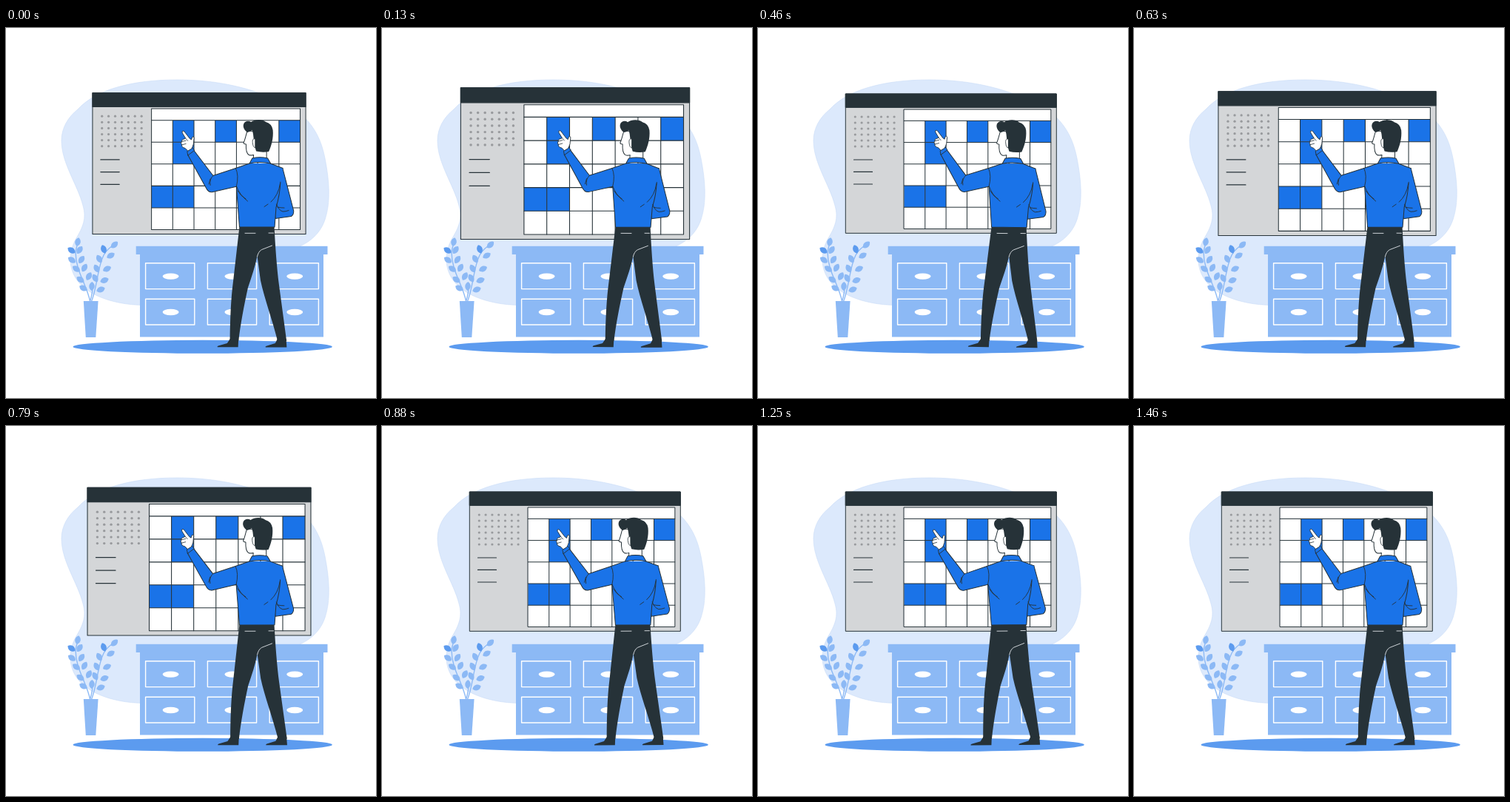
An HTML page with a canvas that plays this animation: 500x500 px, repeating every 1.5 s.

```html
<!DOCTYPE html>
<html lang="en">
<head>
<meta charset="utf-8">
<title>Planning board</title>
<style>
  html, body { margin: 0; width: 100%; height: 100%; overflow: hidden; background: #fff; }
  canvas { display: block; width: 500px; height: 500px; }
</style>
</head>
<body>
<canvas id="stage"></canvas>
<script>
const canvas = document.getElementById('stage');
const ctx = canvas.getContext('2d');
const ratio = window.devicePixelRatio || 1;
canvas.width = canvas.height = 500 * ratio;

const INK = '#263238', BLUE = '#1a73e8', LIGHT = '#8cb9f5', MID = '#5c9bef',
      PALE = '#dce9fc', GREY = '#d4d6d8', WHITE = '#fff';
const LOOP = 1500, STEP = LOOP / 36;

// Keyframes as [time, value], linear in between.
const PULSE = [[0, 1], [202, 1.12], [420, 1], [600, 1], [750, 1.11], [890, 1], [1500, 1]];
const SWAY = [[0, 0], [375, 1], [1125, -1], [1500, 0]];

function valueAt(keys, t) {
  const i = keys.findIndex(key => key[0] > t);
  const [t0, a] = keys[i - 1], [t1, b] = keys[i];
  return a + (b - a) * (t - t0) / (t1 - t0);
}

function shape(d, fill, stroke, width = 1) {
  const path = new Path2D(d);
  if (fill) { ctx.fillStyle = fill; ctx.fill(path); }
  if (stroke) { ctx.strokeStyle = stroke; ctx.lineWidth = width; ctx.stroke(path); }
}

function box(x, y, w, h, fill, stroke, width = 1) {
  if (fill) { ctx.fillStyle = fill; ctx.fillRect(x, y, w, h); }
  if (stroke) { ctx.strokeStyle = stroke; ctx.lineWidth = width; ctx.strokeRect(x, y, w, h); }
}

function ellipse(x, y, rx, ry, fill) {
  ctx.fillStyle = fill;
  ctx.beginPath();
  ctx.ellipse(x, y, rx, ry, 0, 0, Math.PI * 2);
  ctx.fill();
}

function around(x, y, transform, draw) {
  ctx.save();
  ctx.translate(x, y);
  transform();
  ctx.translate(-x, -y);
  draw();
  ctx.restore();
}

function leaf(x, y, degrees, color = LIGHT) {
  around(x, y, () => ctx.rotate(degrees * Math.PI / 180), () => {
    ctx.translate(x, y);
    shape('M0 6C-5 3-5-3 0-6C5-3 5 3 0 6Z', color);
  });
}

function drawBackdrop() {
  shape('M97 110C121 83 171 70 231 70C289 70 332 82 368 98C410 116 425 145 431 176C437 207 439 235 431 259C424 280 407 293 384 300L200 374C160 377 115 366 97 342C84 325 84 303 95 284C104 269 109 257 104 240C97 212 75 183 75 152C75 135 84 120 97 110Z', PALE, '#c9dcf6', 0.6);
  ellipse(265.7, 430.8, 175.2, 9, MID);
}

function drawCabinet() {
  box(181, 305, 248, 112.5, LIGHT);
  box(175.7, 294.8, 258.8, 11.2, LIGHT);
  for (let col = 0; col < 3; col++) {
    for (let row = 0; row < 2; row++) {
      const x = 188.6 + col * 83.8, y = 317.8 + row * 48.4;
      box(x, y, 66.2, 34.8, null, WHITE, 1.4);
      ellipse(x + 34, y + 17.8, 11, 4.2, WHITE);
    }
  }
}

function drawPlant() {
  shape('M114 371C109 345 94 330 94 302L97 290M115 371C124 348 123 325 132 307Q137 298 146 293M114 368Q117 358 117 350', null, LIGHT, 1.4);
  [[97, 289, 12], [99.5, 300, 35], [89, 313.5, -55], [102, 313, 35], [95, 325.5, -55],
   [106, 324, 30], [100.5, 340, -55], [112, 335.5, 30], [104.5, 351.5, -60], [116, 349, 5],
   [146.5, 293, 48], [141.5, 307.5, 60], [126, 312, -30], [136.5, 325.5, 65], [122.5, 325, -30],
   [133, 341, 70], [120.5, 338, -30], [128, 353.5, 70]].forEach(args => leaf(...args));
  leaf(88.5, 300.5, -55, MID);
  leaf(132, 299, -20, MID);
  shape('M104.8 369H124.6L121.3 418H107.8Z', LIGHT);
}

function drawBoard() {
  const left = 197.4, top = 110, first = 125.4, cellW = 28.35, cellH = 29.2;
  const right = left + 7 * cellW, bottom = first + 5 * cellH;
  box(118.7, 89, 284.6, 188.3, GREY, INK);
  box(118.7, 89, 284.6, 18.4, INK, INK);
  box(left, top, right - left, bottom - top, WHITE);
  [[1, 0], [1, 1], [3, 0], [6, 0], [0, 3], [1, 3]].forEach(([col, row]) =>
    box(left + col * cellW, first + row * cellH, cellW, cellH, BLUE));
  let lines = '';
  for (let col = 1; col < 7; col++) lines += `M${left + col * cellW} ${first}V${bottom}`;
  for (let row = 0; row < 5; row++) lines += `M${left} ${first + row * cellH}H${right}`;
  shape(lines, null, INK);
  box(left, top, right - left, bottom - top, null, INK);
  for (let col = 0; col < 7; col++)
    for (let row = 0; row < 6; row++)
      ellipse(131.3 + col * 8.8, 120 + row * 8, 1.6, 1.6, '#989a9d');
  shape('M129.5 178H154.5M129.5 194.4H154.5M129.5 211H154.5', null, INK, 1.2);
}

function drawLegs() {
  shape('M315.5 268H362.5C364 296 366 324 369 347L379.3 423H367.2C360 394 349 365 344 341L339.5 308C337 322 332 336 327 351C322 374 317 400 314.4 423H302.7C303 392 304 366 307 343Z', INK);
  shape('M303 420H314.3L313.8 431.2H286Q285 430.4 287 429.5L299 426Z', INK);
  shape('M367 420H378.7L379.5 431.4H351Q350 430.6 352 429.7L364 426Z', INK);
  shape('M339.5 309Q341 302 345.5 299.5L359.5 294M323 277.3H337M355 277H361.5', null, '#dfe4e8', 0.9);
}

function drawHead() {
  shape('M326 139C324 145 323 151 321 155Q321 157 324.3 157C324 163 324.5 169 328 171.5Q331 172.5 334.5 171.5L334 178H352V163L345 140Z', WHITE, INK);
  shape('M326 141C320 137 319 130 323 127Q327 124.5 331 127C336 123 347 123 351 127Q359 129 360.5 138C361.5 149 358.5 159 355 167Q346 168.5 338 166.5L336 160L334.5 149Q334 142 332.5 138Q329 140.5 326 141Z', INK);
  shape('M336.5 150C333.5 148.5 332.5 152 333.3 156Q334 162 336.5 161.5Z', WHITE, INK, 0.8);
}

function drawShirt() {
  shape('M363 189L373.8 189.5L388.7 247Q389 252 385.5 254.5L364 257.5L360 215Z', BLUE, INK);
  shape('M329 183L310.3 189.5L279.8 199.5L253.5 165L245.6 171.5L270 215.5Q273.5 223 279.5 221.6L311.3 214.3L315.5 269H363L365 242L374 189.5L357 183Z', BLUE);
  shape('M329 183L310.3 189.5L279.8 199.5L253.5 165L245.6 171.5L270 215.5Q273.5 223 279.5 221.6L311.3 214.3L315.5 269H363L365 242Q370 226 370.8 208M374 189.5L357 183', null, INK);
  shape('M329 183L332.7 176Q343 173.5 353.5 176L357.5 183Q343 180 329 183Z', BLUE, INK);
  shape('M310.3 189.5Q315 199 311.3 214.3M311.5 214Q315 225 326.5 234M313 220Q317 227 324 231M280 199.5Q274.5 204 276 212.5M276 204L274 211M370.5 210Q368 226 358 235M354 238L349 241.5M365.5 238Q368 246 374 248Q378 248 382 246.5M367 242Q371 243 376 243', null, INK, 0.9);
}

function drawHand() {
  shape('M245 166.5L251.5 161.5L254.5 165.5L246 172Z', BLUE, INK, 0.9);
  shape('M245.5 166L242 162.5Q237 161.5 237.5 158Q235.5 155.5 237.5 153.5Q237 150.5 241 150L242.5 149L238.2 142Q237 139 239.5 139.2Q241 139.4 242 141.5L248.2 149.5L250.5 151L251.5 147.5Q253.5 145.8 254 148.5L253.2 157Q252 161 250.7 163Z', WHITE, INK, 0.9);
  shape('M237.5 153.5L243 152.2M237.5 158L243 156.5M242.5 149L245.5 152.5', null, INK, 0.8);
}

function drawMan() {
  drawLegs();
  drawHead();
  drawShirt();
  drawHand();
}

function render(now) {
  // Motion advances in 36 even steps per loop, each posed at its midpoint.
  const step = Math.floor((now % LOOP + 5) / STEP) % 36;
  const phase = (step + 0.5) * STEP;
  const scale = valueAt(PULSE, phase);
  const angle = valueAt(SWAY, phase) * Math.PI / 180;

  ctx.setTransform(ratio, 0, 0, ratio, 0, 0);
  ctx.lineJoin = ctx.lineCap = 'round';
  box(0, 0, 500, 500, WHITE);
  drawBackdrop();
  drawCabinet();
  drawPlant();
  around(261, 183, () => ctx.scale(scale, scale), drawBoard);
  around(313, 278, () => ctx.rotate(angle), drawMan);
}

const start = performance.now();
function tick() {
  render(performance.now() - start);
  requestAnimationFrame(tick);
}
tick();
</script>
</body>
</html>
```
